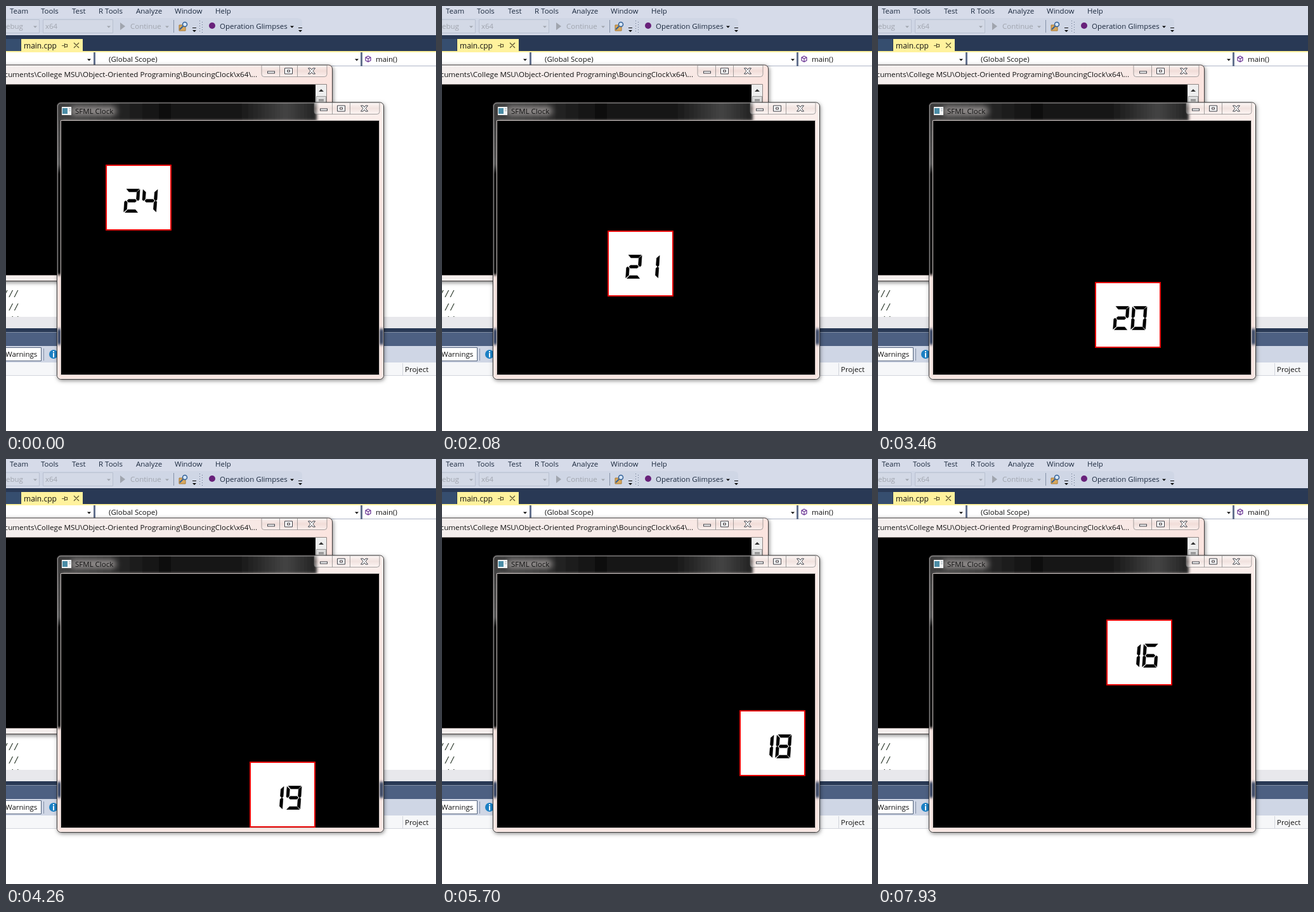
These frames come from a looping animation (678 px wide and 670 px high, 8000 ms). An HTML page:

```html
<!DOCTYPE html>
<html lang="en">
<head>
<meta charset="utf-8">
<title>Bouncing clock</title>
<style>
  html, body { margin: 0; width: 100%; height: 100%; overflow: hidden; background: #fff; }
  svg { display: block; }
  text { font: 11.5px "Open Sans", "Noto Sans", sans-serif; fill: #111; white-space: pre; }
  .menu text { fill: #1b293e; }
  .menu .off text { fill: #a0a5ae; }
  .code text { font: 14px "Liberation Mono", monospace; fill: #263326; }
  .path { font-size: 11.65px; }
  .digit { stroke: #000; stroke-width: .6; }
</style>
</head>
<body>
<svg width="678" height="670" viewBox="0 0 678 670">
  <defs>
    <linearGradient id="glass" x2="0" y2="1">
      <stop offset="0" stop-color="#fbefec"/><stop offset=".5" stop-color="#f5dfda"/><stop offset="1" stop-color="#f8e6e2"/>
    </linearGradient>
    <linearGradient id="consoleBar">
      <stop offset="0" stop-color="#f4efee"/><stop offset=".7" stop-color="#f7eae7"/><stop offset="1" stop-color="#fbe4df"/>
    </linearGradient>
    <linearGradient id="darkBar">
      <stop offset="0" stop-color="#444"/><stop offset=".2" stop-color="#2a2a2a"/><stop offset=".4" stop-color="#111"/>
      <stop offset=".7" stop-color="#161616"/><stop offset=".88" stop-color="#444"/><stop offset="1" stop-color="#222"/>
    </linearGradient>
    <linearGradient id="darkSide" x2="0" y2="1">
      <stop offset="0" stop-color="#3a3939"/><stop offset=".35" stop-color="#555"/><stop offset=".4" stop-color="#111"/><stop offset="1" stop-color="#090909"/>
    </linearGradient>
    <linearGradient id="caption" x2="0" y2="1">
      <stop offset="0" stop-color="#fff" stop-opacity=".55"/><stop offset=".5" stop-color="#e4d2ce" stop-opacity=".4"/><stop offset="1" stop-color="#fff" stop-opacity=".4"/>
    </linearGradient>
    <filter id="shadow" x="-10%" y="-10%" width="120%" height="120%">
      <feDropShadow dx="1" dy="2" stdDeviation="3" flood-opacity=".5"/>
    </filter>
    <filter id="soft" x="-30%" y="-100%" width="160%" height="300%"><feGaussianBlur stdDeviation="5"/></filter>
    <filter id="edge" x="-100%" y="-30%" width="300%" height="160%"><feGaussianBlur stdDeviation="2"/></filter>
    <clipPath id="client"><path d="M88 181H588V581H88Z"/></clipPath>
    <clipPath id="frame"><rect x="81" y="152" width="514" height="436" rx="5"/></clipPath>
    <clipPath id="editor"><path d="M0 95H678V490H0Z"/></clipPath>
    <path id="down" d="M-3 -1.5H3L0 1.5Z"/>
    <g id="overflow"><path d="M-3 -4H3V-3H-3Z"/><path d="M-3 0H3L0 3Z"/></g>
    <g id="buttons">
      <path d="M0 0V14Q0 18 4 18H99Q103 18 103 14V0Z" fill="url(#caption)" stroke="#777" stroke-opacity=".65"/>
      <path d="M28.5 0V18M56.5 0V18" stroke="#777" stroke-opacity=".65"/>
      <g fill="#fff" stroke="#3e4148">
        <rect x="9.500" y="9.500" width="11" height="3"/>
        <path d="M36.500 4.500H48.500V13.500H36.500ZM40.500 7.500H44.500V10.500H40.500Z" fill-rule="evenodd"/>
        <path d="M73.500 4.500H77L79 7L81 4.500H84.500L81 9L84.500 13.500H81L79 11L77 13.500H73.500L77 9Z"/>
      </g>
    </g>
  </defs>

  <!-- Menu and toolbar -->
  <g class="menu">
    <path d="M0 0H678V46H0Z" fill="#d6dbe9"/>
    <path d="M0 19H458Q467 19 467 25V44H0Z" fill="#cfd6e5"/>
    <text x="6" y="12">Team</text><text x="55" y="12">Tools</text><text x="104" y="12">Test</text>
    <text x="146" y="12">R Tools</text><text x="205" y="12">Analyze</text>
    <text x="266" y="12">Window</text><text x="330" y="12">Help</text>
    <g class="off" fill="#a0a5ae">
      <path d="M-1 21.500H52.500V42.500H-1ZM58.500 21.500H168.500V42.500H58.500Z" fill="#d3d9e6" stroke="#b8c0d0"/>
      <text x="0" y="36">ebug</text><text x="62" y="36">x64</text><text x="196" y="36">Continue</text>
      <path d="M180 26L188 32L180 38Z"/>
      <use href="#down" x="46" y="33"/><use href="#down" x="162" y="33"/><use href="#down" x="254" y="33"/>
    </g>
    <path d="M264.500 22V42" stroke="#8591a8"/>
    <path d="M273 30H283V39H273Z" fill="#d9a85c" stroke="#a87832"/>
    <circle cx="282" cy="29" r="3.500" fill="#d7e7f8" stroke="#315f96" stroke-width="1.500"/>
    <path d="M279 32L274 37" stroke="#315f96" stroke-width="2"/>
    <use href="#overflow" x="297" y="38"/><use href="#overflow" x="464" y="38"/>
    <path d="M305.500 23V43M309.500 25V43" stroke="#66728a" stroke-dasharray="1 3"/>
    <circle cx="325" cy="31" r="5" fill="#68217a"/>
    <text x="337" y="36">Operation Glimpses</text><use href="#down" x="451" y="33"/>
  </g>

  <!-- Document tabs and navigation bar -->
  <path d="M0 46H678V72H0Z" fill="#293955"/>
  <path d="M0 52H23V71H0Z" fill="#364e6f"/>
  <path d="M0 71H24V52H121V71H678V74H0Z" fill="#fff29d"/>
  <text x="28" y="67" style="font-size:12px">main.cpp</text>
  <path d="M88 62.500H92M92.500 59V66M93 60.500H96.500V64.500H93M107 58L115 66M115 58L107 66" fill="none" stroke="#5c5330" stroke-width="1.200"/>
  <path d="M0 73H678V95H0Z" fill="#fff"/>
  <path d="M0 94.500H678" stroke="#aeb6c7"/>
  <path d="M139.500 73V95M560.500 73V95" stroke="#64728f" stroke-width="3"/>
  <use href="#down" x="131" y="85"/><use href="#down" x="553" y="85"/>
  <text x="162" y="88">(Global Scope)</text><text x="583" y="88">main()</text>
  <path d="M571 79L575 81V86L571 88L567 86V81ZM567 81L571 83L575 81M571 83V88" fill="none" stroke="#652d90" stroke-width="1.200"/>

  <!-- Editor and lower panel -->
  <g class="code" clip-path="url(#editor)">
    <text x="-5" y="459">///</text><text x="3.500" y="480">//</text><text x="3.500" y="500">//</text>
  </g>
  <path d="M0 490H678V508H0Z" fill="#e8e8ec"/>
  <path d="M0 508H678V515H0Z" fill="#293955"/>
  <path d="M0 514H678V536H0Z" fill="#4d6082"/>
  <path d="M0 514.500H678" stroke="#8592a8"/>
  <path d="M0 536H678V562H0Z" fill="#cfd6e5"/>
  <path d="M-1 538.500H55.500V559.500H-1Z" fill="#fff" stroke="#53627c"/>
  <text x="-1" y="553">Warnings</text>
  <path d="M59.500 540V559" stroke="#8591a8"/>
  <circle cx="75" cy="549" r="7" fill="#1b80c4"/>
  <path d="M74 544H76V546H74ZM74 547H76V554H74Z" fill="#fff"/>
  <path d="M0 562H678V583H0Z" fill="#f6f7f9"/>
  <path d="M0 582.500H678M625.500 563V582" stroke="#d2d5dd"/>
  <text x="629" y="577">Project</text>

  <!-- Console window -->
  <rect x="-20" y="93" width="534.500" height="340.500" rx="6" fill="url(#consoleBar)" stroke="#423e3e" filter="url(#shadow)"/>
  <path d="M0 94.500H509" stroke="#fff" stroke-opacity=".7"/>
  <text class="path" x="396" y="112" text-anchor="end">cuments\College MSU\Object-Oriented Programing\BouncingClock\x64\...</text>
  <use href="#buttons" x="403" y="93.500"/>
  <path d="M0 123.500H505.500V424.500H0" fill="none" stroke="#8e8583"/>
  <path d="M0 124H488V424H0Z"/>
  <path d="M488 124H505V424H488Z" fill="#eee"/>
  <path d="M489.500 142.500H504.500V175H489.500Z" fill="#ddd" stroke="#999"/>
  <path d="M493 135H501L497 131Z" fill="#333"/>
  <path d="M493 147.500H501M493 149.500H501" stroke="#666"/>

  <!-- Clock window -->
  <rect x="80.500" y="152" width="515" height="436.500" rx="6" fill="url(#glass)" filter="url(#shadow)"/>
  <g clip-path="url(#frame)">
    <path d="M79 150H490V181H79Z" fill="url(#darkBar)" filter="url(#edge)"/>
    <path d="M78 156H89V424H78Z" fill="url(#darkSide)" filter="url(#edge)"/>
    <path d="M78 509H89V534H78ZM588 509H599V534H588Z" fill="#3c4965" filter="url(#edge)"/>
    <rect x="102" y="158" width="72" height="15" rx="7" fill="#8f8b8a" filter="url(#soft)"/>
  </g>
  <rect x="80.500" y="152" width="515" height="436.500" rx="6" fill="none" stroke="#3a3737"/>
  <rect x="81.500" y="153" width="513" height="434.500" rx="5" fill="none" stroke="#fff" stroke-opacity=".45"/>
  <path d="M88 159H103V172H88Z" fill="#f2f4f5"/>
  <path d="M89 161H97V170H89Z" fill="#4b8ca5"/>
  <path d="M99 162H102M99 165H102" stroke="#9ca8b0"/>
  <text x="109" y="170">SFML Clock</text>
  <use href="#buttons" x="486" y="152.500"/>
  <path d="M86.500 180.500H588.500V581.500H86.500Z" stroke="#c9c1bf"/>

  <g clip-path="url(#client)">
    <g id="box">
      <rect x="1" y="1" width="102" height="102" fill="#fff" stroke="#e80000" stroke-width="2"/>
      <path class="digit" transform="translate(31.200 38.500) skewX(-4)"/>
      <path class="digit" transform="translate(59.200 38.500) skewX(-4)"/>
    </g>
  </g>
</svg>
<script>
const LOOP = 8000, LAST_STEP = 7930, STEP_TIME = 76;
const START = { x: 157, y: 250 }, FLOOR = 479, WALL = 486;

// Seven segments, a to g, in a 23 by 37 cell.
const segments = {
  a: "M2 0H22L18 4.500H6Z",
  b: "M23 1V17L21 18.500L18.500 16V5Z",
  c: "M23 36V20L21 18.500L18.500 21V32Z",
  d: "M2 37H22L18 32.500H6Z",
  e: "M0 36V20L2 18.500L4.500 21V32Z",
  f: "M0 1V17L2 18.500L4.500 16V5Z",
  g: "M4 18.500L6 16.300H17L19 18.500L17 20.700H6Z"
};
const digitSegments = ["abcdef", "bc", "abged", "abgcd", "fgbc", "afgcd", "afgedc", "abc", "abcdefg", "abcdfg"];

// Time in ms and distance travelled along each axis; each span is played in equal steps.
const knots = [[0, 0], [850, 30], [1700, 79], [2540, 135], [3390, 181], [4260, 227],
               [5100, 275], [5930, 326], [6540, 369], [6780, 383], [7620, 436], [8460, 488]];

const box = document.getElementById("box");
const digits = document.querySelectorAll(".digit");

function travelled(time) {
  const i = knots.findLastIndex(([start]) => time >= start);
  const [t0, d0] = knots[i], [t1, d1] = knots[i + 1];
  const steps = Math.round((t1 - t0) / STEP_TIME);
  const step = Math.min(steps - 1, Math.floor((time - t0) / (t1 - t0) * steps + 0.25));
  return Math.round(d0 + (d1 - d0) * step / steps);
}

const bounce = (value, limit) => limit - Math.abs(limit - value);

function draw(now) {
  const time = Math.min(now % LOOP, LAST_STEP);
  const distance = travelled(time);
  const x = bounce(START.x + distance, WALL);
  const y = bounce(START.y + distance, FLOOR);
  box.setAttribute("transform", `translate(${x} ${y})`);

  const seconds = time < 110 ? 24 : 23 - Math.floor((time - 110) / 980);
  [...String(seconds)].forEach((n, i) =>
    digits[i].setAttribute("d", [...digitSegments[n]].map(s => segments[s]).join("")));
}

function tick() {
  draw(performance.now());
  requestAnimationFrame(tick);
}
tick();
</script>
</body>
</html>
```
